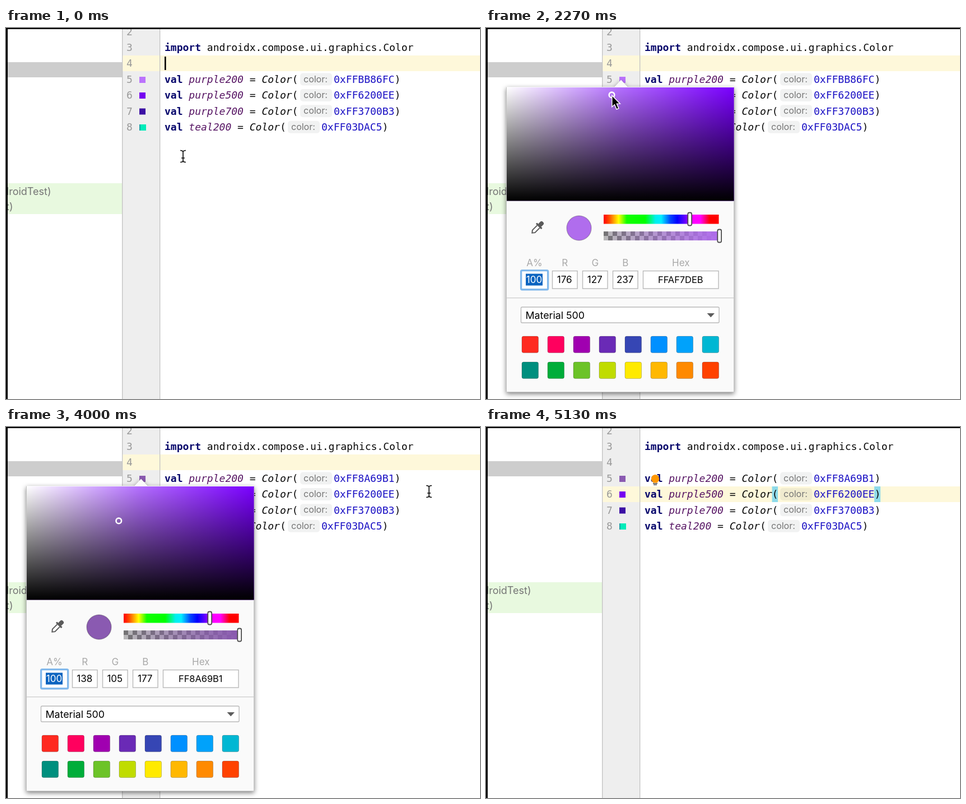
Animation, 846 px wide and 662 px high, one loop 5270 ms. Source, as an HTML page:

```html
<!DOCTYPE html>
<html lang="en">
<head>
<meta charset="utf-8">
<title>Color picker in the editor gutter</title>
<style>
html, body { margin: 0; width: 100%; height: 100%; overflow: hidden; background: #fff; }
svg { display: block; width: 846px; height: 662px; }
text { font-family: Inter, "Open Sans", sans-serif; font-size: 16px; }
.code { font-family: "DejaVu Sans Mono", "Noto Sans Mono", monospace; font-size: 18px; white-space: pre; fill: #080808; }
.kw { font-weight: bold; fill: #06066b; }
.name { font-style: italic; fill: #561463; }
.call { font-style: italic; }
.num { fill: #1a10c4; }
.code.line { fill: #999; }
.hint { fill: #757575; }
.tree { font-size: 18px; fill: #757575; text-anchor: end; }
.label { font-size: 17px; fill: #a9a9a9; text-anchor: middle; }
.value { font-size: 17px; text-anchor: middle; }
.value.hex { font-size: 16.4px; }
.choice { font-size: 17.8px; }
.field { fill: #fff; stroke: #b9b9b9; stroke-width: 1.4; }
.knob { fill: #fff; stroke: #4c4c4c; stroke-width: 1.8; }
</style>
</head>
<body>
<svg id="stage" viewBox="0 0 846 662"></svg>
<script>
const LOOP = 5270, FRAME = 200 / 3;
const OPEN = 1600, CLOSE = 4200;

// Points in time: [ms, ...values], joined by straight lines.
const pointer = [
  [0, 316, 229], [133, 312, 205], [267, 294, 150], [400, 272, 104], [533, 262, 88],
  [800, 249, 78], [933, 242, 82], [1133, 238, 90], [1667, 238, 90], [2067, 227, 108],
  [2200, 226, 114], [2600, 219, 151], [2867, 200.5, 165], [3000, 200, 167],
  [3133, 200, 167], [3333, 335, 140], [3667, 718, 108], [3933, 755, 115]
];
const picked = [
  [2133, 187, 134, 252], [2600, 150, 108, 200], [2866, 139, 105, 184],
  [2890, 139, 104, 182], [2933, 138, 105, 177]
];

function at(keys, t) {
  const i = keys.findIndex(k => k[0] > t);
  if (i === 0) return keys[0].slice(1);
  if (i < 0) return keys[keys.length - 1].slice(1);
  const [a, b] = [keys[i - 1], keys[i]];
  const p = (t - a[0]) / (b[0] - a[0]);
  return a.slice(1).map((v, n) => v + (b[n + 1] - v) * p);
}
const rgbAt = t => at(picked, t).map(Math.round);
const hexOf = c => "FF" + c.map(v => v.toString(16).padStart(2, "0")).join("").toUpperCase();
const tint = ([r, g, b]) => `rgb(${r},${Math.round(g * 0.86)},${b})`;

const rect = (x, y, w, h, fill, more = "") =>
  `<rect x="${x}" y="${y}" width="${w}" height="${h}" fill="${fill}" ${more}/>`;
const text = (cls, x, y, s, more = "") => `<text class="${cls}" x="${x}" y="${y}" ${more}>${s}</text>`;
const span = (cls, s) => `<tspan class="${cls}">${s}</tspan>`;

function declaration(row, name, hex, x, id = "") {
  const y = 98 + row * 28.4;
  return text("code", 283, y, `${span("kw", "val")} ${span("name", name)} = ${span("call", "Color")}(`) +
    rect(x - 60, y - 17.5, 57, 22, "rgba(0,30,30,.055)", 'rx="5"') +
    text("hint", x - 54, y - 1.5, "color:") +
    text("code", x, y, `<tspan class="num" ${id}>0x${hex}</tspan>)`);
}

function field(x, w, label, id) {
  const mid = x + w / 2;
  return text("label", mid, 425, label) +
    `<rect class="field" x="${x}" y="433.5" width="${w}" height="31.5"/>` +
    text("value " + id, mid - 0.5, 455.3, "", `id="${id}"`);
}

const rainbow = [
  [0, "#f00"], [0.05, "#ff5000"], [0.13, "#ff0"], [0.2, "#1f0"], [0.36, "#0f0"],
  [0.45, "#0ee"], [0.5, "#0ef"], [0.58, "#04f"], [0.64, "#00f"], [0.73, "#80f"],
  [0.78, "#f0f"], [0.84, "#f0f"], [0.92, "#f00"]
].map(([o, c]) => `<stop offset="${o}" stop-color="${c}"/>`).join("");

const palette = [
  "#ff2a20", "#ff005e", "#a000b0", "#6a2ab6", "#3646b4", "#0090ff", "#00a2fb", "#00b7d3",
  "#008f7e", "#00ad3a", "#6cc328", "#c0dc00", "#ffea00", "#ffb800", "#ff8a00", "#ff4200"
].map((c, i) => rect(64 + 46 * (i % 8), i < 8 ? 550 : 596, 29.5, 29.5, c,
  'rx="3" stroke="#000" stroke-opacity=".22"')).join("");

const editor = `
  ${rect(0, 0, 846, 662, "#fff")}
  ${rect(0, 61, 207, 27, "#cdcdcd")}
  ${rect(0, 277, 207, 55, "#e8f9df")}
  ${text("tree", 80.5, 298, "(androidTest)")}
  ${text("tree", 12.5, 325, "(test)")}
  ${rect(207, 0, 68, 662, "#eee")}
  ${rect(207, 0, 1.3, 662, "#c2c2c2")}
  <rect id="row" x="208.5" width="638" height="28" fill="#fef8da"/>
  ${rect(274, 0, 1.3, 662, "#c2c2c2")}
  <g id="brackets">${rect(510.5, 106, 10.5, 28, "#8fdbea")}${rect(693, 106, 11, 28, "#8fdbea")}</g>
  ${[2, 3, 4, 5, 6, 7, 8].map((n, i) => text("code line", 215, 12.6 + 28.4 * i, n)).join("")}
  ${rect(238, 87, 11, 11, "#b974fa", 'id="icon"')}
  ${rect(238, 115, 11, 11, "#7600f0")}
  ${rect(238, 143.5, 11, 11, "#3c0fa4")}
  ${rect(238, 172, 12, 11, "#00ecb9")}${rect(238, 172, 2, 11, "#12a3a6")}
  ${text("code", 283, 41, span("kw", "import") + " androidx.compose.ui.graphics.Color")}
  ${declaration(0, "purple200", "FFBB86FC", 585, 'id="literal"')}
  ${declaration(1, "purple500", "FF6200EE", 585)}
  ${declaration(2, "purple700", "FF3700B3", 585)}
  ${declaration(3, "teal200", "FF03DAC5", 563)}
  ${rect(283, 51, 2.6, 24, "#000", 'id="caretTop"')}
  ${rect(703.5, 108.5, 2.6, 23, "#000", 'id="caretLow"')}
  <g id="bulb">
    <path d="M302 85a7.3 7.3 0 0 1 4 13.2V99.5H298V98.2A7.3 7.3 0 0 1 302 85Z" fill="#ff9800"/>
    ${rect(298, 100, 8, 1.4, "#444")}${rect(299, 102.4, 6, 1.4, "#444")}
  </g>
  ${rect(0, 0, 846, 2, "#000")}${rect(0, 0, 3, 662, "#000")}`;

const popup = `<g id="popup">
  <path d="M36 105H229.5L241 92.5L252.5 105H443V650H36Z" fill="#fafafa"
    style="filter:drop-shadow(0 3px 4px rgba(0,0,0,.5))"/>
  <path d="M36.5 105.5V649.5H442.5V105.5" fill="none" stroke="#c4c4c4"/>
  ${rect(37, 106, 405.5, 202.5, "#7a00ff")}
  ${rect(37, 106, 405.5, 202.5, "url(#white)")}
  ${rect(37, 106, 405.5, 202.5, "url(#black)")}
  <circle id="ring" r="4.8" fill="none" stroke="#fff" stroke-width="2.6"/>
  <g transform="translate(91.5 356.5) rotate(45)" fill="#5a5a5a">
    ${rect(-3.8, -14.5, 7.6, 10, "#5a5a5a", 'rx="3.4"')}
    ${rect(-6.8, -6.2, 13.6, 3.2, "#5a5a5a", 'rx="1"')}
    <path d="M-3.2 -3V9L0 13L3.2 9V-3" fill="none" stroke="#5a5a5a" stroke-width="2"/>
  </g>
  <circle id="swatch" cx="166" cy="357" r="22" stroke="#000" stroke-opacity=".22" stroke-width="1.4"/>
  ${rect(210, 333, 205.5, 16.5, "url(#hue)")}
  ${rect(210, 363, 205.5, 16, "url(#checks)")}
  ${rect(210, 363, 205.5, 16, "url(#alpha)")}
  <rect class="knob" x="360.3" y="329.5" width="6.8" height="23" rx="2.5"/>
  <rect class="knob" x="413.3" y="359.5" width="6.8" height="23" rx="2.5"/>
  ${text("label", 86.5, 425, "A%")}
  ${rect(62.6, 432.6, 48, 34.2, "#fff", 'rx="2" stroke="#82b9ec" stroke-width="3.4"')}
  ${rect(71, 438.5, 30, 21, "#0b64c0")}
  ${text("value", 86, 455.3, "100", 'fill="#fff"')}
  ${rect(99.5, 438.5, 2, 21, "#0a1c3c", 'id="caretField"')}
  ${field(118.5, 44.5, "R", "red")}
  ${field(172.5, 44.5, "G", "green")}
  ${field(226.5, 44.5, "B", "blue")}
  ${field(280.5, 134.5, "Hex", "hex")}
  ${rect(37, 481, 405.5, 1.2, "#cacaca")}
  <rect class="field" x="62.5" y="498" width="353.5" height="28" rx="2"/>
  ${text("choice", 70.5, 518.5, "Material 500")}
  <path d="M394.5 509H408L401.2 516.3Z" fill="#5c5c5c"/>
  ${palette}
</g>`;

document.getElementById("stage").innerHTML = `<defs>
  <linearGradient id="white">
    <stop stop-color="#fff"/><stop offset=".5" stop-color="#fff" stop-opacity=".43"/>
    <stop offset="1" stop-color="#fff" stop-opacity="0"/>
  </linearGradient>
  <linearGradient id="black" x2="0" y2="1"><stop stop-opacity="0"/><stop offset="1"/></linearGradient>
  <linearGradient id="hue">${rainbow}</linearGradient>
  <linearGradient id="alpha"><stop id="clear" stop-opacity="0"/><stop id="solid" offset="1"/></linearGradient>
  <pattern id="checks" x="210" y="363" width="16" height="16" patternUnits="userSpaceOnUse">
    ${rect(0, 0, 16, 16, "#b8b8b8")}${rect(0, 0, 8, 8, "#747474")}${rect(8, 8, 8, 8, "#747474")}
  </pattern></defs>
  ${editor}${popup}
  <path id="arrow" d="M0 0V20.5L4.6 16.4L8.2 24.8L12 23.2L8.5 15H14.5Z" fill="#000" stroke="#fff" stroke-width="1.4"/>
  <g id="beam" fill="none">${[["#fff", 3.4], ["#111", 1.7]].map(([c, w]) =>
    `<path d="M-5 -10.5Q0 -10.5 0 -7.5Q0 -10.5 5 -10.5M0 -8V8M-5 10.5Q0 10.5 0 7.5Q0 10.5 5 10.5M-3 3H3" stroke="${c}" stroke-width="${w}"/>`).join("")}</g>`;

const el = {};
document.querySelectorAll("[id]").forEach(e => el[e.id] = e);
const show = (e, on) => e.setAttribute("visibility", on ? "visible" : "hidden");
const set = (e, attrs) => Object.entries(attrs).forEach(([k, v]) => e.setAttribute(k, v));

function drawPicker(t) {
  const c = rgbAt(t), [r, g, b] = c, color = tint(c);
  set(el.ring, { cx: 36.5 + 405 * (b - g) / b, cy: 105 + 204 * (1 - b / 255) });
  set(el.swatch, { fill: color });
  set(el.clear, { "stop-color": color });
  set(el.solid, { "stop-color": color });
  el.red.textContent = r;
  el.green.textContent = g;
  el.blue.textContent = b;
  el.hex.textContent = hexOf(rgbAt(t + 23));
  show(el.caretField, Math.floor((t - OPEN) / 467) % 2 === 0);
}

function draw(t) {
  const open = t >= OPEN && t < CLOSE, done = t >= CLOSE;
  show(el.popup, open);
  show(el.caretField, false);
  if (open) drawPicker(t);

  const first = rgbAt(0), last = rgbAt(LOOP);
  el.literal.textContent = "0x" + hexOf(t < 3400 ? first : last);
  set(el.icon, { fill: tint(t < 3733 ? first : last) });

  set(el.row, { y: done ? 106 : 49 });
  show(el.brackets, done);
  show(el.caretTop, t < 400 || (t >= 900 && t < 1400));
  show(el.caretLow, done && t < 5130);
  show(el.bulb, t >= 5000);

  const [x, y] = at(pointer, t), inText = x > (open ? 444 : 275), visible = t < 4600;
  set(el.arrow, { transform: `translate(${x} ${y})` });
  set(el.beam, { transform: `translate(${x} ${y})` });
  show(el.arrow, visible && !inText);
  show(el.beam, visible && inText);
}

// The picture steps 15 times a second.
const start = performance.now();
function tick() {
  const t = (performance.now() - start) % LOOP;
  draw(Math.floor((t + 4) / FRAME) * 200 / 3);
  requestAnimationFrame(tick);
}
draw(0);
tick();
</script>
</body>
</html>
```
